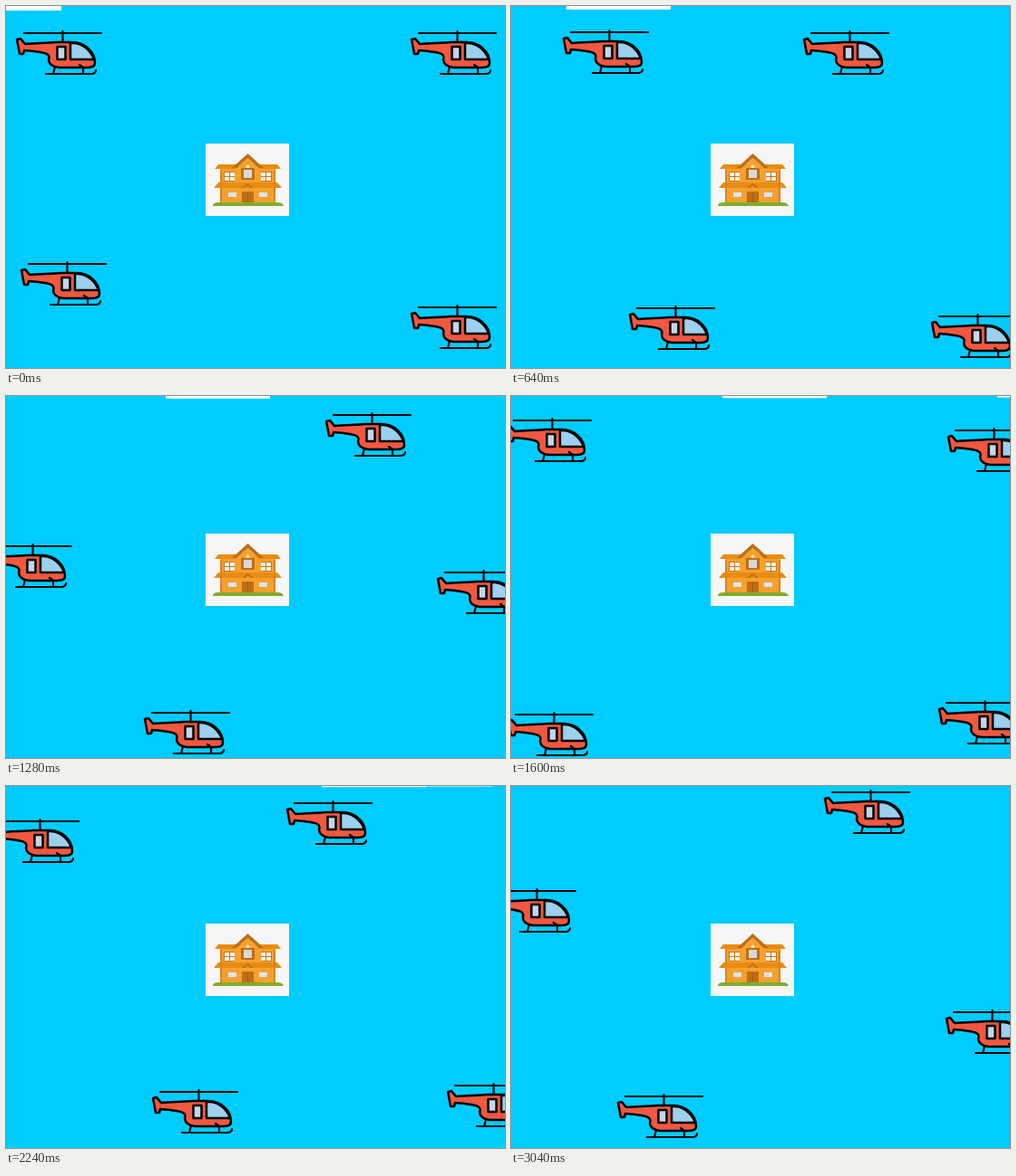
An HTML page with a canvas that plays this animation: 550 px wide and 400 px high, repeating every 3.2 s.

```html
<!DOCTYPE html>
<html lang="en">
<head>
<meta charset="utf-8">
<title>Helicopters circling a house</title>
<style>
  html, body { margin: 0; width: 100%; height: 100%; overflow: hidden; background: #0cf; }
  canvas { display: block; }
</style>
</head>
<body>
<canvas id="stage" width="550" height="400"></canvas>
<script>
const ctx = document.getElementById('stage').getContext('2d');
const STEP_MS = 160;
const STEPS = 20;

// Corners of each round trip, flown at constant speed.
const routes = [
  [[11, 27], [467, 27], [482, 336], [-6, 334], [-23, 113]],
  [[446, 27], [463, 342], [-4, 350], [-15, 4], [345, 4]],
  [[446, 330], [-18, 331], [-25, 24], [469, 12], [479, 247]],
  [[16, 282], [16, 27], [480, 15], [489, 328], [117, 340]]
].map(measure);

const hull = new Path2D('M1 10L5 9L10 15C24 14 36 14 44 13H62C75 13 87 23 87 36' +
  'C87 39 84 41 79 41H47C41 40 36 37 36 32C39 25 28 24 20 23L9 22L8 26H4Z');
const windshield = new Path2D('M60 14H64C75 15 83 23 86 32H60Z');
const door = new Path2D('M45.5 18H54.5V32H45.5Z');
const rotorAndSkids = new Path2D('M9 3H94M51.5 1V13M33 48H84Q88 47 88 44M43 40L41 48M70 38L74 41V48');

function measure(points) {
  const legs = points.slice(1).map((to, i) => {
    const from = points[i];
    return { from, to, length: Math.hypot(to[0] - from[0], to[1] - from[1]) };
  });
  return { legs, length: legs.reduce((sum, leg) => sum + leg.length, 0) };
}

function positionAt({ legs, length }, progress) {
  let left = length * progress;
  for (const leg of legs) {
    if (left <= leg.length || leg === legs.at(-1)) {
      const p = Math.min(1, left / leg.length);
      return leg.from.map((v, axis) => Math.round(v + (leg.to[axis] - v) * p));
    }
    left -= leg.length;
  }
}

function outlined(path, fill) {
  ctx.fillStyle = fill;
  ctx.fill(path);
  ctx.stroke(path);
}

function drawHelicopter([x, y]) {
  ctx.save();
  ctx.translate(x, y);
  ctx.strokeStyle = '#000';
  ctx.lineWidth = 2.5;
  ctx.lineCap = ctx.lineJoin = 'round';
  outlined(hull, '#f0583f');
  outlined(windshield, '#9cd0ee');
  outlined(door, '#c3d6ea');
  ctx.lineWidth = 2.2;
  ctx.stroke(rotorAndSkids);
  ctx.restore();
}

function rect(color, x, y, w, h) {
  ctx.fillStyle = color;
  ctx.fillRect(x, y, w, h);
}

function shape(color, data) {
  ctx.fillStyle = color;
  ctx.fill(new Path2D(data));
}

function mirrored(drawSide) {
  drawSide();
  ctx.save();
  ctx.translate(533, 0);
  ctx.scale(-1, 1);
  drawSide();
  ctx.restore();
}

function drawWing() {
  rect('#d58522', 236, 181, 2, 36);
  rect('#c97a16', 240, 183, 12, 11);
  for (const x of [241, 247])
    for (const y of [184, 189]) rect('#e9f1ef', x, y, 5, 4);
  rect('#e0a24a', 244, 205, 11, 7);
  rect('#dfe3e6', 245, 206, 9, 5);
}

function drawHouse() {
  const wall = '#f6a02d', roof = '#e88c12', trim = '#bd6f16';
  rect('#f6f6f6', 220, 152, 92, 80);
  rect(wall, 236, 179, 61, 38);
  shape(roof, 'M234 175H299L303 180H230Z');
  shape(wall, 'M252 181L266.5 168L281 181V195H252Z');
  shape(trim, 'M249 179L266.5 163L284 179H279L266.5 168L254 179Z');
  shape('#eee5bd', 'M266.5 175L269 177.5L266.5 180L264 177.5Z');
  rect(trim, 259, 179, 15, 13);
  rect('#d5d9dc', 262, 181, 9, 9);
  shape(roof, 'M234 195H299L304 201H229Z');
  shape(trim, 'M260 201L266.5 196L273 201H270L266.5 198L263 201Z');
  mirrored(drawWing);
  rect(trim, 260, 205, 13, 12);
  rect('#a95d13', 266, 206, 1, 11);
  shape('#80ac2f', 'M228 221Q228 217 234 217H299Q305 217 306 221Z');
}

function drawCloud(x, bottom, step) {
  rect('#fff', Math.round(x), 0, 115, Math.max(0, bottom - 0.27 * step));
}

function draw(now) {
  const step = Math.floor(now / STEP_MS) % STEPS;
  rect('#0cf', 0, 0, 550, 400);
  drawCloud(-54 + 28.7 * step, 5, step);
  drawCloud(823 - 28.7 * step, 4.3, step);
  drawHouse();
  routes.forEach(route => drawHelicopter(positionAt(route, step / (STEPS - 1))));
}

let start;
function tick(now) {
  start ??= now;
  draw(now - start);
  requestAnimationFrame(tick);
}
draw(0);
requestAnimationFrame(tick);
</script>
</body>
</html>
```
